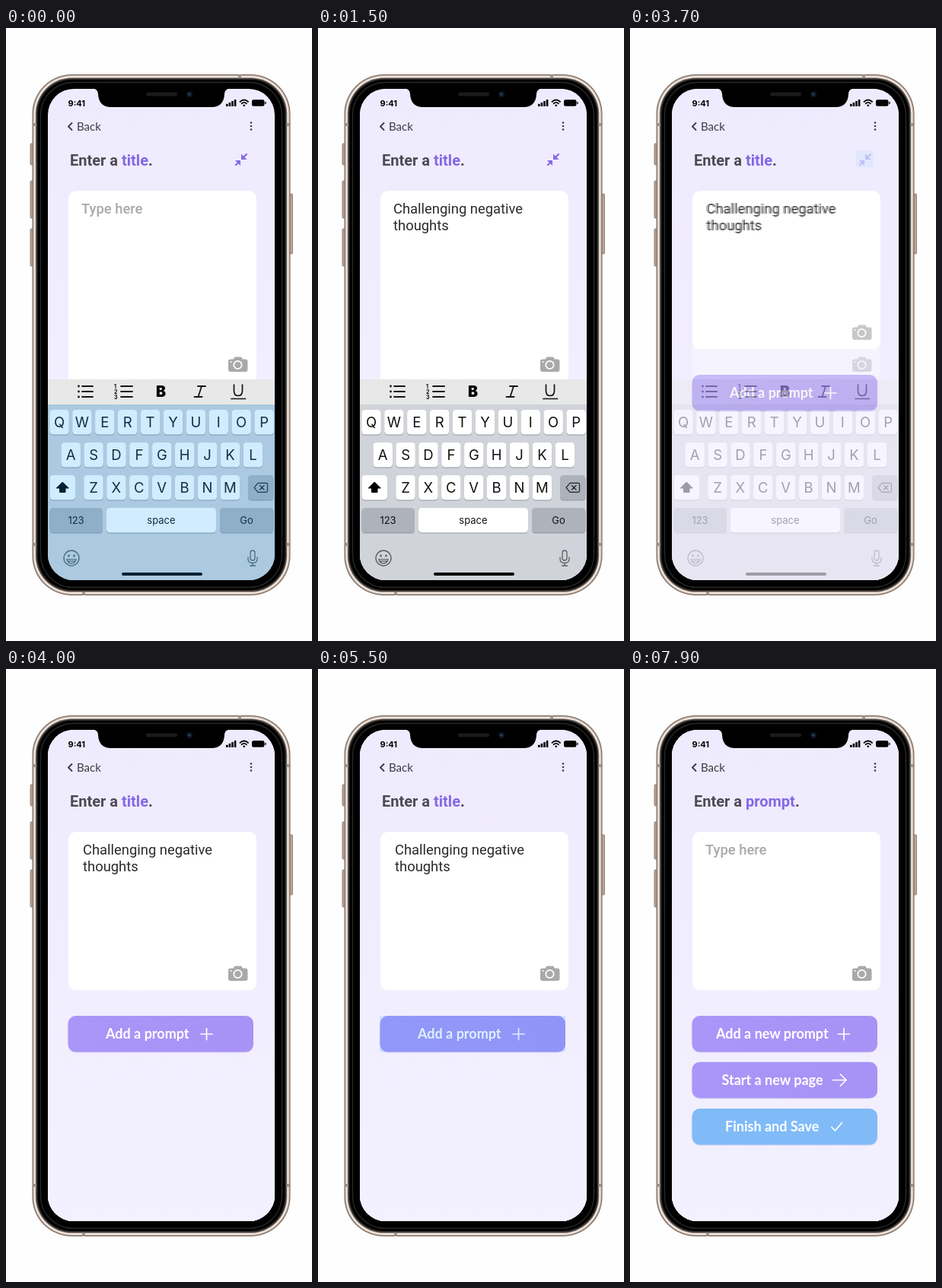
These frames come from a looping animation (402x806 px, 8000 ms). An HTML page:

```html
<!DOCTYPE html>
<html lang="en">
<head>
<meta charset="utf-8">
<title>Journal entry</title>
<style>
  html, body { margin: 0; width: 100%; height: 100%; overflow: hidden; background: #fefefe; }
  svg { display: block; width: 402px; height: 806px; }
  .title { font: 700 20px Roboto, sans-serif; fill: #4c4a55; }
  .body { font: 400 18.4px Roboto, sans-serif; fill: #2b2b2e; }
  .hint { font: 500 18.4px Roboto, sans-serif; fill: #a9a9ab; }
  .label { font: 700 18px Lato, sans-serif; fill: #fff; }
  .key { font: 400 18.5px Inter, sans-serif; fill: #111; text-anchor: middle; }
  .small { font-size: 13px; }
  .line { fill: none; stroke-linecap: round; stroke-linejoin: round; }
</style>
</head>
<body>
<svg id="stage" viewBox="0 0 402 806" xmlns="http://www.w3.org/2000/svg"></svg>
<script>
const LOOP = 8000, STEP = 100;
const PURPLE = '#8468e6', BLUE = '#80bbf8', GLOW = '#18a0fb';

const rect = (x, y, w, h, r, fill, extra = '') =>
  `<rect x="${x}" y="${y}" width="${w}" height="${h}" rx="${r}" fill="${fill}" ${extra}/>`;
const line = (d, color, width, extra = '') =>
  `<path class="line" d="${d}" stroke="${color}" stroke-width="${width}" ${extra}/>`;
const dot = (x, y, r, fill) => `<circle cx="${x}" cy="${y}" r="${r}" fill="${fill}"/>`;
const text = (x, y, cls, s, extra = '') => `<text x="${x}" y="${y}" class="${cls}" ${extra}>${s}</text>`;
const glow = (id, x, y, w, h) => rect(x, y, w, h, 0, GLOW, `id="${id}" opacity="0"`);

const title = word =>
  text(84, 180.5, 'title', `Enter a <tspan fill="${PURPLE}">${word}</tspan>.`);
const note = x => text(x, 243.5, 'body', 'Challenging negative') + text(x, 265.5, 'body', 'thoughts');
const hint = () => text(99, 243.5, 'hint', 'Type here');

function camera(dy) {
  return `<g transform="translate(0 ${dy})">
    <path d="M295 435.5h3.5l2-3h8.5l2 3h3.5q3 0 3 3v10.5q0 3-3 3h-19.5q-3 0-3-3v-10.5q0-3 3-3z" fill="#a9a9ab"/>
    <circle cx="304.5" cy="443" r="5.2" fill="none" stroke="#fff" stroke-width="1.8"/>
    ${dot(295.7, 439, 1, '#fff')}</g>`;
}

function collapseIcon() {
  return line('M316 166L310.5 171.5M302 180L306.5 175.5', PURPLE, 2.2) +
    `<path d="M309 165.5V173h7.5zM301 174h7v7z" fill="${PURPLE}"/>`;
}

function toolbar() {
  const ink = '#151515';
  let s = rect(55, 462, 298, 33, 0, '#e8e8e8');
  [471, 478, 485].forEach((y, i) => {
    s += dot(95.5, y, 1.4, ink) + line(`M100 ${y}H114`, ink, 1.8);
    s += line(`M151 ${y}H166`, ink, 1.8);
    s += text(142, y + 2.5, '', i + 1, 'font-family="Inter, sans-serif" font-size="7" font-weight="700"');
  });
  s += text(197, 485, '', 'B', 'font-family="Inter, sans-serif" font-size="19.5" font-weight="900"');
  s += line('M252 471H262M247.5 485H257.5M257 471L252.5 485', ink, 1.8);
  return s + line('M299.5 469V477Q299.5 483.5 305 483.5T310.5 477V469M296 487.5H314.5', ink, 1.7);
}

function keyCap(x, y, w, fill) {
  return rect(x, y + 1, w, 32.5, 4.5, '#92969d') + rect(x, y, w, 32.5, 4.5, fill);
}

function keyboard() {
  const grey = '#adb2bb', ink = '#5b6068';
  let s = rect(55, 495, 298, 232, 0, '#d0d3d9');
  [['QWERTYUIOP', 70, 502], ['ASDFGHJKL', 85.2, 545], ['ZXCVBNM', 115, 588]].forEach(([row, x0, y]) => {
    [...row].forEach((c, i) => {
      const x = x0 + i * 29.9;
      s += keyCap(x - 12.7, y, 25.4, '#fff') + text(x, y + 23, 'key', c);
    });
  });
  s += keyCap(57.5, 588, 33.5, '#fff') + keyCap(318, 588, 33.5, grey);
  s += '<path d="M74.3 597l8 8h-4.3v5.5h-7.4v-5.5h-4.3z" fill="#000" stroke="#000" stroke-linejoin="round"/>';
  s += line('M326 604.3L331 598.3H342Q343.5 598.3 343.5 600V608.5Q343.5 610.3 342 610.3H331zM333.5 601.5L339 607M339 601.5L333.5 607', '#222', 1.2);
  s += keyCap(57.5, 631, 69.5, grey) + keyCap(132, 631, 144, '#fff') + keyCap(281, 631, 70.5, grey);
  s += text(92, 652, 'key small', '123') + text(204, 652, 'key small', 'space') + text(316, 652, 'key small', 'Go');
  s += `<circle cx="86" cy="697" r="10" fill="none" stroke="${ink}" stroke-width="1.4"/>`;
  s += dot(82.5, 694, 1.4, ink) + dot(89.5, 694, 1.4, ink);
  s += line('M79.8 698.5H92.2Q91 703.8 86 703.8T79.8 698.5M81 700.8H91', ink, 1.2);
  s += rect(321, 687, 6, 13, 3, 'none', `stroke="${ink}" stroke-width="1.3"`);
  s += line('M318 696V698Q318 703.5 324 703.5T330 698V696M324 703.5V707M320.5 707H327.5', ink, 1.3);
  return s + rect(152, 716, 106, 4, 2, '#000');
}

function button(y, fill, label, x, icon) {
  return rect(81.5, y + 1, 243.5, 47.5, 10, '#7a68c0', 'opacity=".22"') +
    rect(81.5, y, 243.5, 47.5, 10, fill) +
    text(x, y + 30, 'label', label) + line(icon, '#fff', 1.7);
}
const plus = x => `M${x - 7.5} 480H${x + 7.5}M${x} 472.5V487.5`;

const screen = (id, content) =>
  `<g id="${id}">${rect(55, 80, 298, 647, 0, 'url(#lilac)')}<g id="${id}Content">${content}</g></g>`;
const typing = entry => title('title') + collapseIcon() + rect(82, 214, 247, 260, 10, '#fff') +
  entry + camera(0) + toolbar() + keyboard();
const reading = (word, entry) => title(word) + rect(82, 214, 247, 208.5, 10, '#fff') + entry + camera(-42);

function statusBar() {
  const ink = '#050505', grey = '#3d3b46';
  let s = text(81.5, 103, '', '9:41', 'font-family="Inter, sans-serif" font-size="11" font-weight="700"');
  for (let i = 0; i < 4; i++) s += rect(289 + i * 3.6, 99.8 - i * 1.9, 2.6, 3.2 + i * 1.9, .6, ink);
  s += line('M307.5 97Q312.8 92 318.1 97M309.6 99.3Q312.8 96.4 316 99.3', ink, 1.8) + dot(312.8, 101.8, 1.4, ink);
  s += rect(323, 94.2, 16.5, 8.6, 2.2, ink) + rect(340.2, 97, 1.5, 3, .7, ink);
  s += line('M86.5 125L82 129.5L86.5 134', grey, 1.9);
  s += text(93, 134.5, '', 'Back', `font-family="Lato, sans-serif" font-size="15" fill="${grey}"`);
  return s + [124.5, 129, 133.5].map(y => dot(322, y, 1.3, grey)).join('');
}

function phone() {
  let s = '';
  [[152, 28], [201, 49], [264, 49]].forEach(([y, h]) => {
    s += rect(32, y, 4, h, 1.2, '#b9a597', 'stroke="#76655b" stroke-width=".7"');
  });
  s += rect(372.5, 218, 4, 79, 1.2, '#b9a597', 'stroke="#76655b" stroke-width=".7"');
  const shells = [[0, '#75645a'], [1, '#c3b1a4'], [2.3, '#f2ebe5'], [4.2, '#897a70'], [5.2, '#33302e'], [7, '#000']];
  shells.forEach(([d, fill]) => {
    s += rect(34.5 + d, 61 + d, 339 - 2 * d, 685 - 2 * d, 52 - d, fill);
  });
  s += rect(45.5, 71.5, 317, 664, 43, 'none', 'stroke="#282828" stroke-width="1.4"');
  [[35, 125], [368.5, 125], [35, 677], [368.5, 677]].forEach(([x, y]) => s += rect(x, y, 5, 4, 0, '#9a9088'));
  return s + rect(305, 61, 4, 4, 0, '#9a9088') + rect(100, 741, 4, 5, 0, '#9a9088');
}

function notch() {
  return '<path d="M114 79.5Q121 80.5 121 87Q122 104 138 104H270Q286 104 287 87Q287 80.5 294 79.5z"/>' +
    rect(184, 84.5, 41, 5, 2.5, '#1b1b1b') + dot(241, 87, 4.2, '#0c1420') + dot(241, 87, 2, '#1c3a56');
}

document.getElementById('stage').innerHTML = `
  <defs>
    <linearGradient id="lilac" x2="0" y2="1"><stop stop-color="#efebfe"/><stop offset="1" stop-color="#f3f0ff"/></linearGradient>
    <linearGradient id="violet"><stop stop-color="#a996f8"/><stop offset="1" stop-color="#a792f5"/></linearGradient>
    <clipPath id="glass"><rect x="55" y="80" width="298" height="646" rx="34"/></clipPath>
  </defs>
  ${phone()}
  <g clip-path="url(#glass)">
    ${screen('empty', typing(hint()) + rect(55, 495, 298, 232, 0, GLOW, 'opacity=".2"'))}
    ${screen('written', typing(note(99)) + glow('iconGlow', 297, 161, 22.5, 22))}
    ${screen('closed', reading('title', note(101)) +
      button(456, 'url(#violet)', 'Add a prompt', 131, plus(263.5)) + glow('buttonGlow', 81, 456, 244, 47.5))}
    ${screen('prompt', reading('prompt', hint()) +
      button(456, 'url(#violet)', 'Add a new prompt', 113, plus(281)) +
      button(516.7, 'url(#violet)', 'Start a new page', 120.5, 'M266.5 540.5H284M276.5 533L284 540.5L276.5 548') +
      button(578, BLUE, 'Finish and Save', 125, 'M265 602.5L269.5 607L278.5 596.5'))}
    ${statusBar()}
  </g>
  ${notch()}`;

const el = id => document.getElementById(id);
const progress = (t, start, length) => Math.min(1, Math.max(0, (t - start) / length));
const easeOut = p => 1 - (1 - p) ** 1.5;

function draw(t) {
  const fade = (id, start, length) => {
    const p = easeOut(progress(t, start, length));
    el(id).setAttribute('opacity', p);
    return p;
  };
  fade('written', 0, 900);
  fade('closed', 3400, 600);
  const p = fade('prompt', 5900, 900);
  const nudge = p < 1 ? -0.8 : 0;
  el('promptContent').setAttribute('transform', `translate(${nudge / 2} ${nudge})`);
  el('iconGlow').setAttribute('opacity', .2 * progress(t, 2400, 900));
  el('buttonGlow').setAttribute('opacity', .2 * progress(t, 4800, 900));
}

const origin = performance.now();
function tick() {
  const t = (performance.now() - origin) % LOOP;
  draw(Math.floor(t / STEP) * STEP);
  requestAnimationFrame(tick);
}
tick();
</script>
</body>
</html>
```
